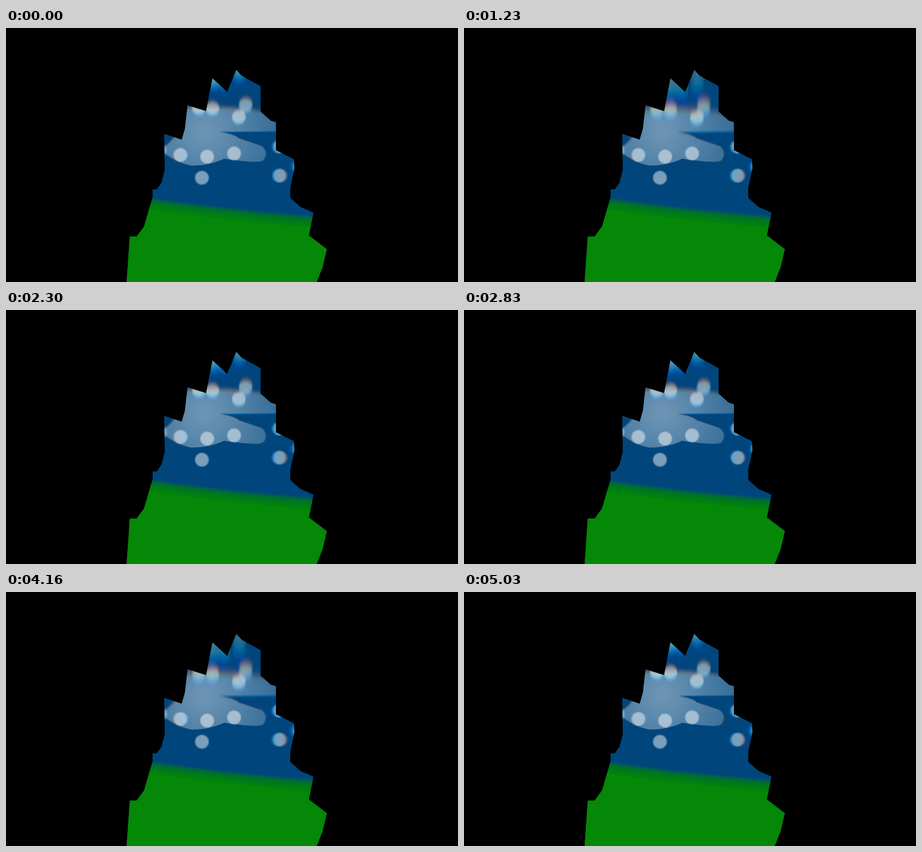
Animation of 854x480 px, one loop 5.1 s. Source, as an HTML page with a canvas:

```html
<!DOCTYPE html>
<html lang="en">
<head>
<meta charset="utf-8">
<title>Spectral drift</title>
<style>
html, body { margin: 0; width: 100%; height: 100%; overflow: hidden; background: #000; }
canvas { display: block; }
</style>
</head>
<body>
<canvas id="stage" width="854" height="480"></canvas>
<script>
const LOOP = 5100, STEP = 200 / 3, SAMPLES = 8;
// Sky area that gets the colour fringes
const X = 270, Y = 75, W = 320, H = 310;

const layer = (w, h) => Object.assign(document.createElement('canvas'), { width: w, height: h }).getContext('2d');
const main = document.getElementById('stage').getContext('2d');
const scene = layer(W, H), channel = layer(W, H);
scene.translate(-X, -Y);

const outline = new Path2D(`M435 79L445 90 481 110V158L500 175 510 178V231L544 248 545 265
  537 302V321L556 338 581 349 572 392 606 418 598 452 587 480H228L234 394H247L261 375
  277 320V305H285L294 292 300 268 299 200 332 211 338 190 343 146 378 157 390 95 418 121Z`);

const dots = [[441, 72], [411, 91], [390, 92], [453, 143], [440, 167], [390, 150], [364, 149],
  [329, 240], [380, 243], [431, 237], [370, 283], [518, 279], [288, 231], [518, 224], [557, 262]];

// Half-loop sway from lo to hi, lowest at the given time
const sway = (t, lo, hi, lowest) =>
  lo + (hi - lo) * (1 - Math.cos(4 * Math.PI * (t - lowest) / LOOP)) / 2;

// s is the place in the spectrum, v and h the vertical and horizontal spread
function drawScene(s, v, h) {
  const c = scene;
  const at = (x, y) => {
    const dx = 410 - x, dy = Math.max(0, 250 - y);
    return [x + s * h * 4 * dx * Math.abs(dx) / 1e4, y + s * v * 8 * (dy / 80) ** 2];
  };
  const line = (...p) => c.lineTo(...at(...p));
  const curve = (x1, y1, x2, y2) => c.quadraticCurveTo(...at(x1, y1), ...at(x2, y2));

  c.fillStyle = '#00467d';
  c.fillRect(X, Y, W, H);

  const glow = c.createRadialGradient(375, 195, 10, 375, 195, 145);
  [.42, .31, .2].forEach((a, i) => glow.addColorStop(i / 2, `rgba(255,255,255,${a})`));
  c.fillStyle = glow;
  c.beginPath();
  line(330, 147);
  line(400, 147);
  curve(450, 147, 525, 162);
  line(525, 195);
  line(403, 196);
  curve(430, 199, 440, 208);
  line(484, 223);
  curve(498, 235, 487, 250);
  curve(479, 257, 412, 247);
  curve(385, 260, 350, 260);
  curve(320, 255, 290, 230);
  curve(312, 214, 316, 206);
  c.fill();

  // Two discs per dot soften its rim
  c.fillStyle = 'rgba(255,255,255,.28)';
  for (const [x, y] of dots) {
    for (const r of [12, 13.8]) {
      c.beginPath();
      c.arc(...at(x, y), r, 0, 7);
      c.fill();
    }
  }
}

function drawGround(h) {
  const top = 321.5 - (h - .6) * 3;
  main.fillStyle = '#058708';
  for (let i = 0; i < 15; i++) {
    const y = top + i * 1.6;
    main.globalAlpha = i < 14 ? .18 : 1;
    main.beginPath();
    main.moveTo(220, y - 8);
    main.lineTo(277, y);
    main.quadraticCurveTo(425, y + 22, 620, y + 37);
    main.lineTo(620, 480);
    main.lineTo(220, 480);
    main.fill();
  }
}

function draw(t) {
  const v = sway(t, .6, 1.2, 0), h = sway(t, .57, 1.17, 600);
  main.clearRect(0, 0, 854, 480);
  main.save();
  main.clip(outline);
  main.globalCompositeOperation = 'lighter';
  ['#f00', '#0f0', '#00f'].forEach((color, n) => {
    channel.globalCompositeOperation = 'source-over';
    // Running average of the displaced scenes
    for (let i = 0; i < SAMPLES; i++) {
      drawScene(-.6 + .4 * n + 1.1 * i / (SAMPLES - 1), v, h);
      channel.globalAlpha = 1 / (i + 1);
      channel.drawImage(scene.canvas, 0, 0);
    }
    channel.globalAlpha = 1;
    channel.globalCompositeOperation = 'multiply';
    channel.fillStyle = color;
    channel.fillRect(0, 0, W, H);
    main.drawImage(channel.canvas, X, Y);
  });
  main.globalCompositeOperation = 'source-over';
  drawGround(h);
  main.restore();
}

let shown = -1;
function tick() {
  const t = performance.now() % LOOP;
  const step = Math.max(0, Math.floor((t - 100) / STEP) + 1);
  if (step !== shown) {
    shown = step;
    draw(step ? 100 + (step - 1) * STEP : 0);
  }
  requestAnimationFrame(tick);
}
tick();
</script>
</body>
</html>
```
